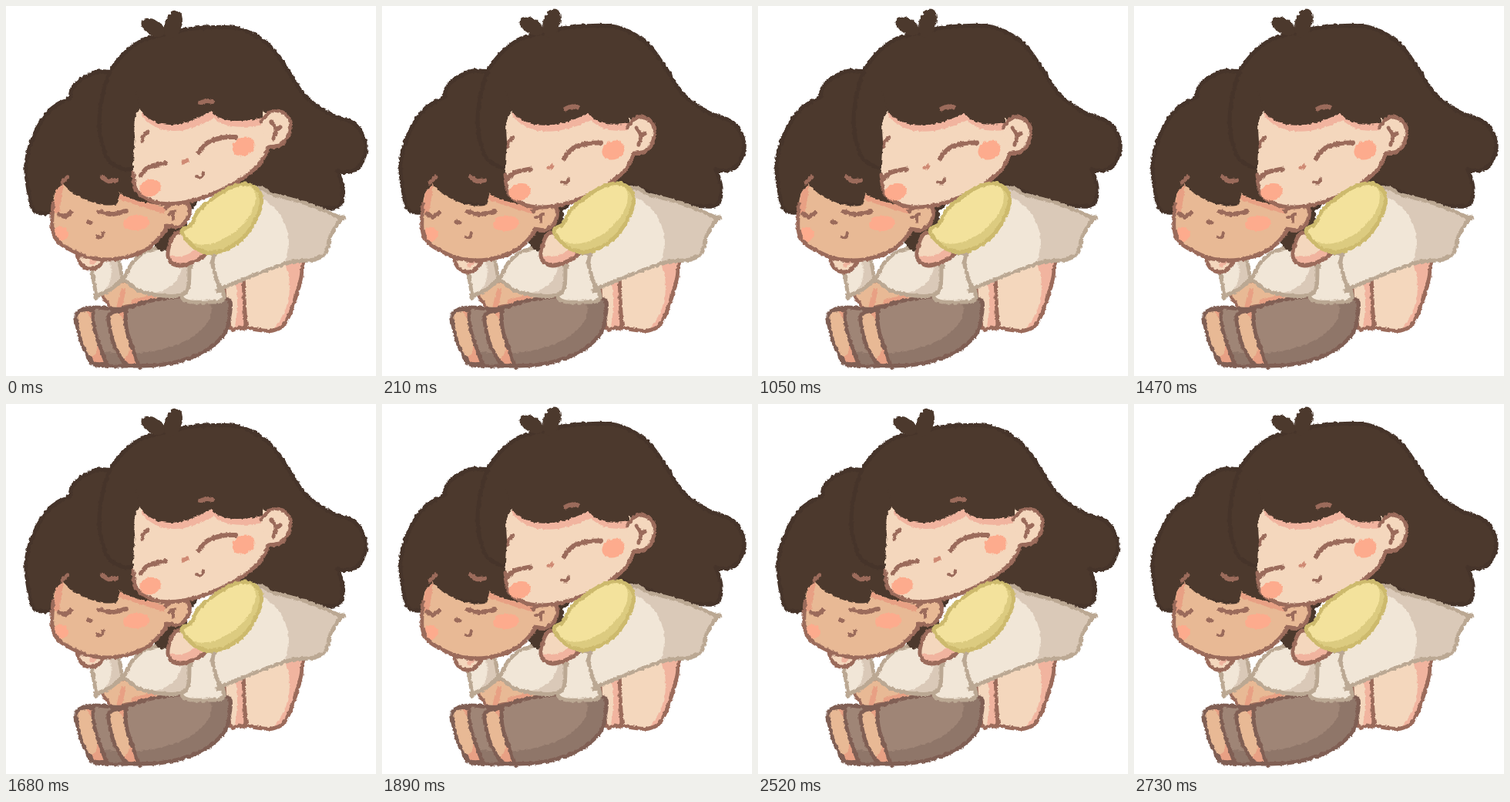
An HTML page that plays this animation: 480x480 px, repeating every 2.94 s.

```html
<!DOCTYPE html>
<html>
<head>
<meta charset="utf-8">
<style>
html, body { margin: 0; width: 100%; height: 100%; overflow: hidden; background: #fff; }
svg { display: block; width: 100vw; height: 100vh; }
</style>
</head>
<body>
<svg viewBox="0 0 480 480">
  <defs>
    <filter id="rough" filterUnits="userSpaceOnUse" x="0" y="0" width="480" height="480" color-interpolation-filters="sRGB">
      <feTurbulence type="fractalNoise" baseFrequency=".22" numOctaves="2" seed="4"/>
      <feDisplacementMap in="SourceGraphic" scale="4" xChannelSelector="R" yChannelSelector="G"/>
    </filter>
  </defs>
  <g id="hug" filter="url(#rough)"></g>
</svg>
<script>
const STEP = 210;
const C = {
  hair: '#4c392d', hairLine: '#46342a', line: '#9b6b5b',
  girl: '#f4d7bd', boy: '#e8b995', pink: '#f1b49f', tan: '#e8a084', blush: '#fdab8d',
  dress: '#f1e6d7', dressShade: '#dac9b8', dressLine: '#bba893',
  yellow: '#f3e29c', yellowShade: '#dccb80', yellowLine: '#cdba6d',
  shorts: '#8f7669', shortsLight: '#9f8576', shortsLine: '#805f54'
};

// Smooth curve through points; a repeated point makes a corner.
function curve(text, closed) {
  const pts = text.split(' ').map(s => s.split(',').map(Number));
  const len = pts.length;
  const at = i => pts[closed ? (i + len) % len : Math.max(0, Math.min(len - 1, i))];
  let d = 'M' + pts[0];
  for (let i = 0; i < (closed ? len : len - 1); i++) {
    const [a, b, c, e] = [at(i - 1), at(i), at(i + 1), at(i + 2)];
    const out = b.map((v, k) => v + (c[k] - a[k]) / 6);
    const into = c.map((v, k) => v - (e[k] - b[k]) / 6);
    d += `C${out} ${into} ${c}`;
  }
  return d;
}

const paint = (d, fill, stroke = 'none', w = 5) =>
  `<path d="${d}" fill="${fill}" stroke="${stroke}" stroke-width="${w}" stroke-linejoin="round" stroke-linecap="round"/>`;
const shape = (pts, fill, stroke, w) => paint(curve(pts, true), fill, stroke, w);
const line = (pts, color = C.line, w = 5) => paint(curve(pts, false), 'none', color, w);
const oval = (x, y, rx, ry, turn, fill = C.blush) =>
  `<ellipse cx="${x}" cy="${y}" rx="${rx}" ry="${ry}" fill="${fill}" transform="rotate(${turn} ${x} ${y})"/>`;
const move = (x, y, body) => `<g transform="translate(${x} ${y})">${body}</g>`;

let clips = 0;
function inside(pts, body) {
  const id = 'clip' + clips++;
  return `<clipPath id="${id}"><path d="${curve(pts, true)}"/></clipPath><g clip-path="url(#${id})">${body}</g>`;
}
// A shaded shape with one lit oval inside it.
const lit = (pts, shade, light, glow, stroke) =>
  shape(pts, shade) + inside(pts, oval(...glow, light)) + shape(pts, 'none', stroke);

const legs = () =>
  lit('284,355 310,350 311,412 302,417 290,415', C.pink, C.girl, [285, 385, 15, 50, 0], C.line) +
  lit('308,350 308,350 386,326 386,326 381,360 364,408 346,421 318,418 311,410', C.pink, C.girl, [325, 373, 42, 60, 12], C.line);

function boyBody() {
  const band = lit('133,403 142,396 155,396 155,396 157,422 172,466 172,466 156,465 143,446 136,425',
    C.tan, C.boy, [143, 422, 14, 36, -18], C.shortsLine);
  return shape('122,365 160,358 205,376 178,386 154,390 143,398', C.boy, C.line, 4) +
    line('152,370 147,390', C.tan, 7) + line('165,384 192,377', C.tan, 6) +
    lit('96,398 112,391 150,393 185,383 225,377 255,383 288,380 290,402 282,427 252,451 205,465 150,467 114,465 104,447 94,412',
      C.shorts, C.shortsLight, [172, 402, 95, 48, -6], C.shortsLine) +
    band + move(-42, -2, band) +
    shape('231,330 270,322 274,350 283,379 262,384 228,378', C.dress, C.dressLine) +
    lit('110,335 110,335 117,376 117,376 135,368 151,355 151,355 142,325', C.dressShade, C.dress, [115, 350, 21, 30, 15], C.dressLine) +
    lit('153,354 153,354 165,332 185,317 215,315 238,338 238,338 237,362 230,374 205,376 172,369', C.dressShade, C.dress, [186, 342, 42, 31, -10], C.dressLine);
}

function boyHead(t) {
  const jaw = '61,256 60,288 67,305 85,317 110,327 145,328 180,317 203,296 210,282';
  const face = jaw + ' 212,262 185,256 165,251 147,243 147,243 143,257 120,257 92,246 74,231 74,231 65,240';
  const ear = '207,262 218,256 236,257 237,273 225,286 208,285';
  return move(-2 * t, -t, shape('130,85 105,91 87,105 83,119 83,119 57,135 37,166 26,205 30,245 37,266 58,268 80,255 150,262 240,262 240,180 190,100', C.hair, C.hairLine)) +
    move(-8 * t, t,
      shape(face, C.boy) +
      inside(face, line('70,232 65,264', C.tan, 9) + line('149,247 175,256 208,266', C.tan, 8)) +
      oval(169, 281, 17, 10, -5) + oval(71, 295, 10, 9, 20) + line(jaw)) +
    move(-11 * t, 4 * t, shape(ear, C.boy) + line(ear) +
      line('211,270 220,266', C.line, 4) + line('217,268 217,276', C.line, 4)) +
    move(-10 * t, 0,
      line('121,267 138,270 156,266', C.line, 6) + line('69,270 76,273 84,268', C.line, 6) +
      line('106,280 110,281') + line('118,299 124,300 126,294', C.line, 4) +
      line('125,222 133,227 143,226', C.line, 6) + line('72,229 80,222'));
}

const girlHair = t => move(3 * t, -2 * t,
  shape('205,37 245,29 300,29 338,48 362,78 388,117 420,140 452,153 467,180 460,206 446,215 431,215 431,215 437,238 433,258 415,262 370,255 330,238 250,215 165,212 148,210 130,195 121,150 131,95 150,65 176,45', C.hair, C.hairLine) +
  oval(191, 28, 17, 10, 30, C.hair) + oval(217, 24, 11, 19, 17, C.hair));

const dress = () =>
  lit('310,245 330,236 345,244 392,257 435,275 435,275 421,298 415,320 400,329 370,332 335,344 278,367 278,367 271,347 271,320',
    C.dressShade, C.dress, [300, 308, 67, 66, 0], C.dressLine);

function girlHead(t) {
  const mix = (a, b) => a + (b - a) * t;
  const jaw = '165,216 168,237 179,248 200,256 230,255 265,245 300,228 328,206 341,183';
  const ear = '331,150 344,137 359,138 369,150 366,168 356,180 341,183';
  // Two hanging locks: left end, parting, right end.
  const [x0, x1, x2] = [mix(176, 169), mix(266, 268), mix(333, 320)];
  const [y0, y1, y2] = [138, mix(136, 139), mix(145, 152)];
  const locks = `M${x0},${y0}Q${x0 + 32},${y0 + 33} ${x1},${y1}Q${x1 + 14},${y1 + 20} ${x2},${y2}`;
  // The head turns: the far side travels more than the near one.
  const turn = body => `<g transform="matrix(${1 - .05 * t} ${.028 * t} 0 1 ${3.2 * t} ${-1.6 * t})">${body}</g>`;
  return turn(shape(jaw + ' 338,140 260,115 176,132 167,180', C.girl) + line(jaw)) +
    move(5, 3, paint(locks, 'none', C.pink, 10)) +
    paint(`${locks}V110H${x0 - 8}Z`, C.hair) +
    turn(shape(ear, C.girl) + line(ear) +
      line('344,150 350,160 347,172', C.line, 5) + line('350,160 356,157', C.line, 5)) +
    move(-8 * t, 5 * t, oval(308, 182, 15, 12, -25) + oval(187, 236, 14, 11, -18)) +
    move(-14 * t, 7.5 * t,
      line('250,190 262,177 280,171 298,170', C.line, 6) + line('175,220 185,209 207,204', C.line, 6) +
      line('230,203 235,200', '#cf8a74') + line('247,221 253,222 256,217', C.line, 4) +
      line('177,175 179,168 184,163') + line('252,126 260,123 268,124', C.line, 6));
}

const girlArm = t =>
  move(-4 * t, 0, lit('222,294 211,314 212,330 225,337 240,333 258,322 245,305', C.pink, C.girl, [228, 308, 24, 16, -20], C.line)) +
  move(-5 * t, -t, lit('228,293 241,283 248,268 265,252 290,236 312,231 328,240 331,258 320,284 305,303 282,317 262,320 243,312',
    C.yellowShade, C.yellow, [277, 268, 54, 32, -38], C.yellowLine));

const scene = t => legs() + boyBody() +
  oval(212, 285, 22, 34, 20, C.hair) +
  move(t, 4 * t, shape('93,320 98,336 110,341 122,336 127,322 110,315', C.girl, C.line) + line('112,332 117,326', C.pink, 7)) +
  boyHead(t) + girlHair(t) + dress() + girlHead(t) + girlArm(t);

const hug = document.getElementById('hug');
const views = [scene(0), scene(1)];
let shown = -1;
function draw(now) {
  const i = Math.floor(now / STEP) % 2;
  if (i !== shown) hug.innerHTML = views[shown = i];
}
let start = null;
function tick(now) {
  if (start === null) start = now;
  draw(now - start);
  requestAnimationFrame(tick);
}
draw(0);
requestAnimationFrame(tick);
</script>
</body>
</html>
```
